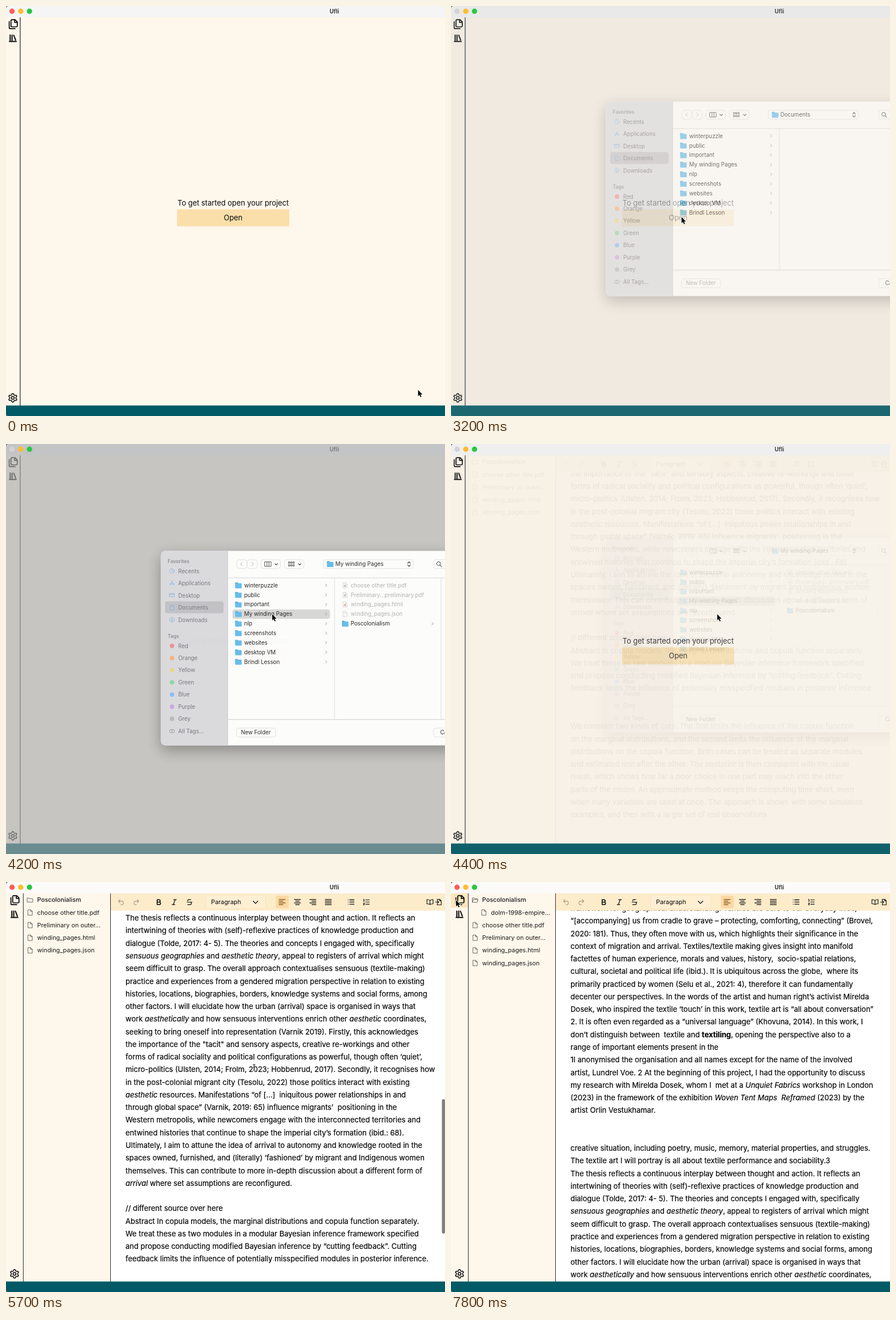
Animation, 775 px wide and 723 px high, one loop 8000 ms. Source, as an HTML page with a canvas:

```html
<!DOCTYPE html>
<html lang="en">
<head>
<meta charset="utf-8">
<title>Writing app</title>
<style>
html, body { margin: 0; width: 100%; height: 100%; overflow: hidden; background: #fef7eb; }
canvas { display: block; width: 775px; height: 723px; }
</style>
</head>
<body>
<canvas id="stage"></canvas>
<script>
const W = 775, H = 723, LOOP = 8000, STEP = 100;
const FONT = 'Inter, "Open Sans", sans-serif';
const INK = '#060607', CREAM = '#fef7eb', SAND = '#fdecca', TEAL = '#025a66';
const ROW = 22.27, BODY = 12.98, EDITOR_AT = 4500, PICK_AT = 4000, UNFOLD_AT = 6800;

const dpr = window.devicePixelRatio || 1;
function makeContext(canvas) {
  canvas.width = W * dpr;
  canvas.height = H * dpr;
  const c = canvas.getContext('2d');
  c.scale(dpr, dpr);
  return c;
}
const screen2d = makeContext(document.getElementById('stage'));
const layer2d = makeContext(document.createElement('canvas'));
let g = screen2d;

// Piecewise interpolation over [time, value, value...] keys
const smooth = p => p * p * (3 - 2 * p);
const linear = p => p;
function track(keys, t, ease = linear) {
  if (t <= keys[0][0]) return keys[0].slice(1);
  for (let i = 1; i < keys.length; i++) {
    const a = keys[i - 1], b = keys[i];
    if (t <= b[0]) {
      const p = ease((t - a[0]) / (b[0] - a[0]));
      return a.slice(1).map((v, k) => v + (b[k + 1] - v) * p);
    }
  }
  return keys[keys.length - 1].slice(1);
}

const POINTER = [[0, 727.5, 677], [100, 712, 285], [1100, 712, 285], [1700, 757, 273], [1800, 757, 273],
  [2700, 407, 372], [3300, 407, 372], [3900, 470, 300], [4900, 470, 300], [5300, 438, 327],
  [5900, 438, 327], [6300, 112, 104], [6500, 103, 30], [7200, 103, 30], [7800, 9, 32]];
const SHEET = [[3100, 0, -24], [3200, .6, -20], [3400, .85, -8], [3700, .96, 0],
  [4200, .95, 0], [4300, .5, -12], [4400, .14, -23], [4500, 0, -24]];
const DIM = [[3100, 0], [3200, .16], [3700, .63], [4200, .63], [4300, .35], [4400, .08], [4500, 0]];
const EDITOR = [[4300, 0], [4400, .05], [4500, 1]];
const SCROLL = [[5400, -170.5], [5700, 63.5], [5900, 300], [6100, 460], [6200, 514]];
const THUMB = [[4900, 0], [5000, .5], [6300, .5], [6600, .25], [6800, 0]];

function box(x, y, w, h, fill, r = 0, line) {
  g.beginPath();
  g.roundRect(x, y, w, h, r);
  if (fill) { g.fillStyle = fill; g.fill(); }
  if (line) { g.strokeStyle = line; g.lineWidth = 1; g.stroke(); }
}
function dot(x, y, r, fill) {
  g.beginPath();
  g.arc(x, y, r, 0, 7);
  g.fillStyle = fill;
  g.fill();
}
function text(s, x, y, size, color = INK, style = '', align = 'left') {
  g.font = `${style} ${size}px ${FONT}`;
  g.textAlign = align;
  g.fillStyle = color;
  g.fillText(s, x, y + size * .36);
}
function icon(d, x, y, size, color = INK, width = 2, fill) {
  g.save();
  g.translate(x, y);
  g.scale(size / 24, size / 24);
  g.translate(-12, -12);
  g.lineCap = g.lineJoin = 'round';
  const p = new Path2D(d);
  if (fill) { g.fillStyle = fill; g.fill(p); }
  g.strokeStyle = color;
  g.lineWidth = width;
  if (width) g.stroke(p);
  g.restore();
}
function layer(alpha, draw) {
  if (alpha <= 0) return;
  const base = g;
  g = layer2d;
  g.clearRect(0, 0, W, H);
  draw();
  g = base;
  g.globalAlpha = alpha;
  g.drawImage(layer2d.canvas, 0, 0, W, H);
  g.globalAlpha = 1;
}

const ICON = {
  files: 'M10 2h7l5 5v9a2 2 0 0 1-2 2H10a2 2 0 0 1-2-2V4a2 2 0 0 1 2-2zM16 2v6h6M4 6.5v13A2.5 2.5 0 0 0 6.5 22H17',
  books: 'M5 4v14M10 4v14M14.5 4.500l5 13M3 21h18',
  undo: 'M9 14 4 9l5-5M4 9h10a5.5 5.5 0 0 1 0 11h-3',
  redo: 'M15 14l5-5-5-5M20 9H10a5.5 5.5 0 0 0 0 11h3',
  bold: 'M7 4h6a4 4 0 0 1 0 8H7zM7 12h7a4 4 0 0 1 0 8H7z',
  italic: 'M19 4h-9M14 20H5M15 4 9 20',
  strike: 'M16 4H9a3 3 0 0 0-2.8 4M14 12a4 4 0 0 1 0 8H6M4 12h16',
  left: 'M2 4h20M2 9.5h13M2 15h20M2 20.5h13',
  center: 'M2 4h20M6 9.5h12M2 15h20M6 20.5h12',
  right: 'M2 4h20M9 9.5h13M2 15h20M9 20.5h13',
  justify: 'M2 4h20M2 9.5h20M2 15h20M2 20.5h20',
  bullets: 'M8 5h14M8 12h14M8 19h14M3 5h.1M3 12h.1M3 19h.1',
  numbers: 'M10 5h12M10 12h12M10 19h12M3 3h1.5v6M3 9h3M6 21H3c0-2 3-3 3-4.500s-2-1.500-3-.5',
  book: 'M12 7v13M12 7C10 5 7 4 2 4v14c5 0 8 1 10 2 2-1 5-2 10-2V4c-5 0-8 1-10 3z',
  send: 'M7 9V3h8l5 5v13H7v-5M15 3v5h5M1 12.500h11m-3-3 3 3-3 3',
  down: 'M5 9l7 7 7-7',
  next: 'M9 5l7 7-7 7',
  prev: 'M15 5l-7 7 7 7',
  updown: 'M7 9l5-6 5 6M7 15l5 6 5-6',
  columns: 'M1 4h22v16H1zM8.500 4v16M15.500 4v16',
  grid: 'M2 4h4v5H2zM10 4h4v5h-4zM18 4h4v5h-4zM2 14h4v5H2zM10 14h4v5h-4zM18 14h4v5h-4z',
  find: 'M17 10a7 7 0 1 1-14 0 7 7 0 0 1 14 0zM15.500 15.500 22 22',
  folder: 'M2 5h7l2 3h11v12H2z',
  unfolded: 'M2 20V5h7l2 3h9v3M2 20l3-9h18l-3 9z',
  file: 'M5 2h9l6 6v14H5zM14 2v6h6',
  clock: 'M22 12a10 10 0 1 1-20 0 10 10 0 0 1 20 0zM12 6v6l4 2',
  apps: 'M4 20 13 3M20 20 11 3M2 15h20',
  desk: 'M2 4h20v14H2zM2 8h20',
  arrow: 'M22 12a10 10 0 1 1-20 0 10 10 0 0 1 20 0zM12 6v11m-4-4 4 4 4-4',
  tags: 'M8 6h8a6 6 0 0 1 0 12H8A6 6 0 0 1 8 6zM8 6a6 6 0 0 1 0 12',
  beam: 'M9 3q3 0 3 3v12q0 3-3 3M15 3q-3 0-3 3v12q0 3 3 3M10 12h4',
  hand: 'M8 13V4a2 2 0 0 1 4 0v6a2 2 0 0 1 3.500 0 2 2 0 0 1 3.500 1 2 2 0 0 1 2.500 2v3c0 4-2 6-3 7h-8c-1-3-4-5-6-8-1-2 1-3 3-1z'
};

function gear(x, y) {
  g.beginPath();
  for (let i = 0; i <= 72; i++) {
    const a = i / 72 * Math.PI * 2;
    const r = 6.5 + 1.1 * Math.tanh(2.2 * Math.cos(6 * a + Math.PI));
    g.lineTo(x + r * Math.cos(a), y + r * Math.sin(a));
  }
  g.closePath();
  g.moveTo(x + 2.5, y);
  g.arc(x, y, 2.5, 0, 7);
  g.strokeStyle = INK;
  g.lineWidth = 1.5;
  g.stroke();
}
function rail(x) {
  icon(ICON.files, x, 32, 19, INK, 2.2);
  icon(ICON.books, x, 56.5, 16, INK, 3);
  gear(x, 691);
}
function home() {
  box(0, 0, W, H, CREAM);
  box(24.4, 20, 1.3, 685, '#30323a');
  rail(12);
  text('To get started open your project', 401, 347.5, 12.92, INK, '', 'center');
  box(302, 358.5, 198, 30, '#fbdfaa');
  text('Open', 401, 373.7, 12.92, INK, '', 'center');
}

// _italic_ and #bold# spans; the line at index -FIRST starts with "The thesis"
const FIRST = -21;
const DOC = `framework for geographical understanding. Textiles are core to our everyday lives,
“[accompanying] us from cradle to grave – protecting, comforting, connecting” (Brovel,
2020: 181). Thus, they often move with us, which highlights their significance in the
context of migration and arrival. Textiles/textile making gives insight into manifold
factettes of human experience, morals and values, history,  socio-spatial relations,
cultural, societal and political life (ibid.). It is ubiquitous across the globe,  where its
primarily practiced by women (Selu et al., 2021: 4), therefore it can fundamentally
decenter our perspectives. In the words of the artist and human right’s activist Mirelda
Dosek, who inspired the textile ‘touch’ in this work, textile art is “all about conversation”
2. It is often even regarded as a “universal language” (Khovuna, 2014). In this work, I
don’t distinguish between  textile and #textiling#, opening the perspective also to a
range of important elements present in the
1I anonymised the organisation and all names except for the name of the involved
artist, Lundrel Voe. 2 At the beginning of this project, I had the opportunity to discuss
my research with Mirelda Dosek, whom I  met at a _Unquiet Fabrics_ workshop in London
(2023) in the framework of the exhibition _Woven Tent Maps  Reframed_ (2023) by the
artist Orlin Vestukhamar.


creative situation, including poetry, music, memory, material properties, and struggles.
The textile art I will portray is all about textile performance and sociability.3
The thesis reflects a continuous interplay between thought and action. It reflects an
intertwining of theories with (self)-reflexive practices of knowledge production and
dialogue (Tolde, 2017: 4- 5). The theories and concepts I engaged with, specifically
_sensuous geographies_ and _aesthetic theory_, appeal to registers of arrival which might
seem difficult to grasp. The overall approach contextualises sensuous (textile-making)
practice and experiences from a gendered migration perspective in relation to existing
histories, locations, biographies, borders, knowledge systems and social forms, among
other factors. I will elucidate how the urban (arrival) space is organised in ways that
work _aesthetically_ and how sensuous interventions enrich other _aesthetic_ coordinates,
seeking to bring oneself into representation (Varnik 2019). Firstly, this acknowledges
the importance of the "tacit" and sensory aspects, creative re-workings and other
forms of radical sociality and political configurations as powerful, though often ‘quiet’,
micro-politics (Ulsten, 2014; Frolm, 2023; Hobbenrud, 2017). Secondly, it recognises how
in the post-colonial migrant city (Tesolu, 2022) those politics interact with existing
_aesthetic_ resources. Manifestations “of […]  iniquitous power relationships in and
through global space” (Varnik, 2019: 65) influence migrants’  positioning in the
Western metropolis, while newcomers engage with the interconnected territories and
entwined histories that continue to shape the imperial city’s formation (ibid.: 68).
Ultimately, I aim to attune the idea of arrival to autonomy and knowledge rooted in the
spaces owned, furnished, and (literally) ‘fashioned’ by migrant and Indigenous women
themselves. This can contribute to more in-depth discussion about a different form of
_arrival_ where set assumptions are reconfigured.

// different source over here
Abstract In copula models, the marginal distributions and copula function separately.
We treat these as two modules in a modular Bayesian inference framework specified
and propose conducting modified Bayesian inference by “cutting feedback”. Cutting
feedback limits the influence of potentially misspecified modules in posterior inference.


We consider two kinds of cuts. The first limits the influence of the copula function
on the marginal distributions, and the second limits the influence of the marginal
distributions on the copula function. Both cases can be treated as separate modules
and estimated one after the other. The posterior is then compared with the usual
result, which shows how far a poor choice in one part may reach into the other
parts of the model. An approximate method keeps the computing time short, even
when many variables are used at once. The approach is shown with some simulated
examples, and then with a larger set of real observations.`.split('\n');

const STYLE = { _: 'italic', '#': 'bold' };
function richLine(s, x, y) {
  let style = '';
  g.strokeStyle = INK;
  g.lineWidth = .2;
  for (const part of s.split(/([_#])/)) {
    if (STYLE[part]) style = style ? '' : STYLE[part];
    else if (part) {
      text(part, x, y, BODY, INK, style);
      g.strokeText(part, x, y + BODY * .36); // slightly heavier body type
      x += g.measureText(part).width;
    }
  }
}

function toolbar() {
  box(185, 20, 590, 30.5, SAND);
  icon(ICON.undo, 203, 35.5, 13.5, '#a79a84', 2);
  icon(ICON.redo, 230, 35.5, 13.5, '#a79a84', 2);
  icon(ICON.bold, 269.5, 35.5, 13, INK, 2.8);
  icon(ICON.italic, 297, 35.5, 13, INK, 2.2);
  icon(ICON.strike, 324, 35.5, 13, INK, 2.2);
  box(352.5, 23, 106, 24.5, '#feefd3', 3, '#f9e4bb');
  text('Paragraph', 362, 35.5, 10.85);
  icon(ICON.down, 440.5, 35.5, 14, INK, 2.2);
  box(476.5, 24, 22.5, 22.5, '#fbd9a3', 2);
  icon(ICON.left, 487.5, 35.3, 13, '#7a4a12', 2.2);
  ['center', 'right', 'justify'].forEach((k, i) => icon(ICON[k], 514.5 + i * 27.2, 35.3, 13, INK, 2.2));
  icon(ICON.bullets, 609, 35.3, 13, INK, 2.4);
  icon(ICON.numbers, 636, 35.3, 13, INK, 2);
  icon(ICON.book, 748.5, 35.3, 13, INK, 2);
  icon(ICON.send, 764, 35.3, 13, INK, 2);
}
function tree(t, px, py) {
  const open = t >= UNFOLD_AT;
  const rows = ['Poscolonialism', 'choose other title.pdf', 'Preliminary on outer...', 'winding_pages.html', 'winding_pages.json'];
  if (open) rows.splice(1, 0, 'dolm-1998-empire...');
  const inside = t >= 6000 && px > 31 && px < 184;
  rows.forEach((name, i) => {
    const y = 31.5 + i * ROW, child = open && i === 1, dx = child ? 15.5 : 0;
    if (inside && Math.abs(py + 3 - y) < ROW / 2) box(31, y - 11, 153, ROW - 1, '#e6dece');
    icon(i ? ICON.file : open ? ICON.unfolded : ICON.folder, 42.5 + dx, y, 11.5, '#55524d', 1.8);
    text(name, 55 + dx, y, 10.85, '#1a1a1c', i ? '' : '500');
  });
}
function editor(t, px, py) {
  box(0, 20, 185, 685, CREAM);
  if (t >= 7000 && px < 30) box(0, 20, 30, 25, '#fde6bd');
  rail(15);
  tree(t, px, py);
  box(185, 20, 590, 685, '#fff');
  const [top] = track(SCROLL, t);
  DOC.forEach((line, i) => {
    const y = top + (FIRST + i) * ROW;
    if (y > 20 && y < 720) richLine(line, 211, y);
  });
  toolbar();
  const [shade] = track(THUMB, t);
  if (shade) box(769.5, 383 - (top - 63.5) * .346, 5.5, 237, `rgba(0,0,0,${shade})`, 2.8);
  box(30, 20, 1, 685, '#2e2e30');
  box(184, 20, 1, 685, '#2e2e30');
}

const PLACES = [['Recents', 'clock'], ['Applications', 'apps'], ['Desktop', 'desk'], ['Documents', 'file'], ['Downloads', 'arrow']];
const TAGS = [['Red', '#f0918f'], ['Orange', '#f3b47c'], ['Yellow', '#ead884'], ['Green', '#8fd6a2'],
  ['Blue', '#8dbcf0'], ['Purple', '#cfa7e0'], ['Grey', '#b9b9bc']];
const FOLDERS = ['winterpuzzle', 'public', 'important', 'My winding Pages', 'nlp', 'screenshots', 'websites', 'desktop VM', 'Brindl Lesson'];
const LOCKED = ['choose other title.pdf', 'Preliminary...preliminary.pdf', 'winding_pages.html', 'winding_pages.json'];
const PITCH = 16.87;

function blueFolder(x, y) {
  box(x - 5.5, y - 5, 5, 4, '#3fa4dc', 1);
  box(x - 5.5, y - 3.8, 11.5, 9, '#62bdee', 1);
}
function sheet(picked, dy) {
  g.save();
  g.translate(0, dy);
  g.shadowColor = 'rgba(0,0,0,.32)';
  g.shadowBlur = 26 * dpr;
  g.shadowOffsetY = 9 * dpr;
  box(273.5, 188.5, 540, 343, '#fff', 8);
  g.shadowColor = 'transparent';
  box(273.5, 188.5, 118, 343, '#dcdcdf', [8, 0, 0, 8]);
  box(391, 188.5, 1, 343, '#cfcfd2');

  const soft = '#77777c';
  text('Favorites', 285.5, 207, 8.6, '#8d8d92', '600');
  box(281, 277.5, 103, 21, '#c2c2c6', 4);
  PLACES.forEach(([name, key], i) => {
    const y = 224 + i * 21.5;
    icon(ICON[key], 293, y, 10, '#84b4e2', 2);
    text(name, 304, y, 9.8, soft);
  });
  text('Tags', 285.5, 339, 8.6, '#8d8d92', '600');
  TAGS.forEach(([name, color], i) => {
    const y = 356 + i * 21.45;
    dot(293, y, 3.9, color);
    text(name, 304, y, 9.8, soft);
  });
  icon(ICON.tags, 293, 506.3, 11, '#97979c', 1.8);
  text('All Tags...', 304, 506.3, 9.8, soft);

  const edge = '#e4e4e4';
  box(407.5, 204, 17.5, 15.5, '#fff', 4, edge);
  box(426, 204, 17.5, 15.5, '#fff', 4, edge);
  icon(ICON.prev, 416, 211.8, 11, '#a9a9a9', 2);
  icon(ICON.next, 435, 211.8, 11, '#a9a9a9', 2);
  [[450, 'columns'], [491.5, 'grid']].forEach(([x, key]) => {
    box(x, 204, 34.5, 15.5, '#fff', 4, edge);
    icon(ICON[key], x + 12.5, 211.8, 12, '#555', 2);
    icon(ICON.down, x + 27, 212, 8, '#444', 3.4);
  });
  box(560, 204, 159, 15.5, '#fff', 4, edge);
  blueFolder(572, 211.8);
  text(picked ? 'My winding Pages' : 'Documents', 581.5, 211.8, 9.8, '#262626');
  icon(ICON.updown, 711.5, 211.8, 11, '#333', 2.6);
  box(755, 204, 60, 15.5, '#fff', 4, edge);
  icon(ICON.find, 764.5, 211.8, 11, '#444', 2.2);
  box(392, 235.5, 400, 1.4, '#e6e6e6');
  box(392, 485, 400, 1.4, '#dedede');
  box(579.5, 237, 1, 248, '#dfdfdf');

  if (picked) box(400, 291.8, 172, 16.4, '#d8d8d8', 4);
  FOLDERS.forEach((name, i) => {
    const y = 249.2 + i * PITCH;
    blueFolder(410, y);
    text(name, 420.5, y, 9.8, '#222');
    icon(ICON.next, 565, y, 8, '#8a8a8a', 2.6);
  });
  if (picked) {
    box(767.5, 237, 1, 248, '#dfdfdf');
    LOCKED.forEach((name, i) => {
      const y = 249.2 + i * PITCH;
      icon(ICON.file, 598.5, y, 11, '#cfcfcf', 1.6, '#fafafa');
      if (i < 3) dot(598.5, y + 1, 2, i < 2 ? '#c5c0c0' : '#e5b58c');
      text(name, 608.5, y, 9.8, '#b2b2b2');
    });
    const y = 249.2 + 4 * PITCH;
    blueFolder(598.5, y);
    text('Poscolonialism', 608.5, y, 9.8, '#222');
    icon(ICON.next, 753, y, 8, '#8a8a8a', 2.6);
  }
  box(407, 501, 69, 15.8, '#fff', 4, edge);
  text('New Folder', 441, 508.8, 9.8, picked ? '#262626' : '#a0a0a0', '', 'center');
  box(755, 501, 60, 15.8, '#fff', 4, edge);
  text('Cancel', 766.5, 508.8, 9.8, '#262626');
  g.restore();
}

function pointer(t, x, y) {
  if (t >= EDITOR_AT && x > 185 && y > 50) {
    icon(ICON.beam, x, y, 15, '#fff', 3.4);
    icon(ICON.beam, x, y, 15, '#222', 1.6);
  } else if (t >= EDITOR_AT && x > 31 && x < 185) {
    icon(ICON.hand, x + 1.5, y + 5.5, 13.5, '#111', 1.8, '#fff');
  } else {
    g.beginPath();
    [[0, 0], [0, 11], [2.5, 8.7], [4.2, 12.7], [6, 11.9], [4.3, 8.1], [7.6, 7.9]].forEach(p => g.lineTo(x + p[0], y + p[1]));
    g.closePath();
    g.lineJoin = 'round';
    g.strokeStyle = '#fff';
    g.lineWidth = 1.6;
    g.stroke();
    g.fillStyle = '#000';
    g.fill();
  }
}

function lights(t) {
  const busy = t >= 3200 && t < EDITOR_AT;
  [busy ? '#d4d3d2' : '#fe5f57', '#febc2e', '#28c840'].forEach((color, i) => dot(10.7 + i * 15.4, 9.2, 4.7, color));
}
function corners() {
  g.fillStyle = '#77756f';
  for (const [y, s] of [[0, 1], [H, -1]]) {
    g.beginPath();
    g.moveTo(0, y);
    g.lineTo(5, y);
    g.quadraticCurveTo(0, y, 0, y + 5 * s);
    g.fill();
  }
}

function draw(t) {
  const [px, py] = track(POINTER, t, smooth);
  const [fade, dy] = track(SHEET, t);
  const [dim] = track(DIM, t);
  const [shown] = track(EDITOR, t);
  if (shown < 1) home();
  layer(shown, () => editor(t, px, py));
  box(0, 0, W, 20, t >= EDITOR_AT ? '#fdfafa' : '#f5f5f6');
  text('Ufli', 579.5, 9.3, 10, '#3c3c3e', 'bold', 'center');
  box(0, 704.5, W, 18.5, TEAL);
  if (dim) box(0, 0, W, H, `rgba(167,168,170,${dim})`);
  lights(t);
  layer(fade, () => sheet(t >= PICK_AT, dy));
  corners();
  pointer(t, px, py);
}

const start = performance.now();
function frame() {
  const t = (performance.now() - start) % LOOP;
  draw(Math.floor(t / STEP) * STEP);
  requestAnimationFrame(frame);
}
frame();
</script>
</body>
</html>
```
